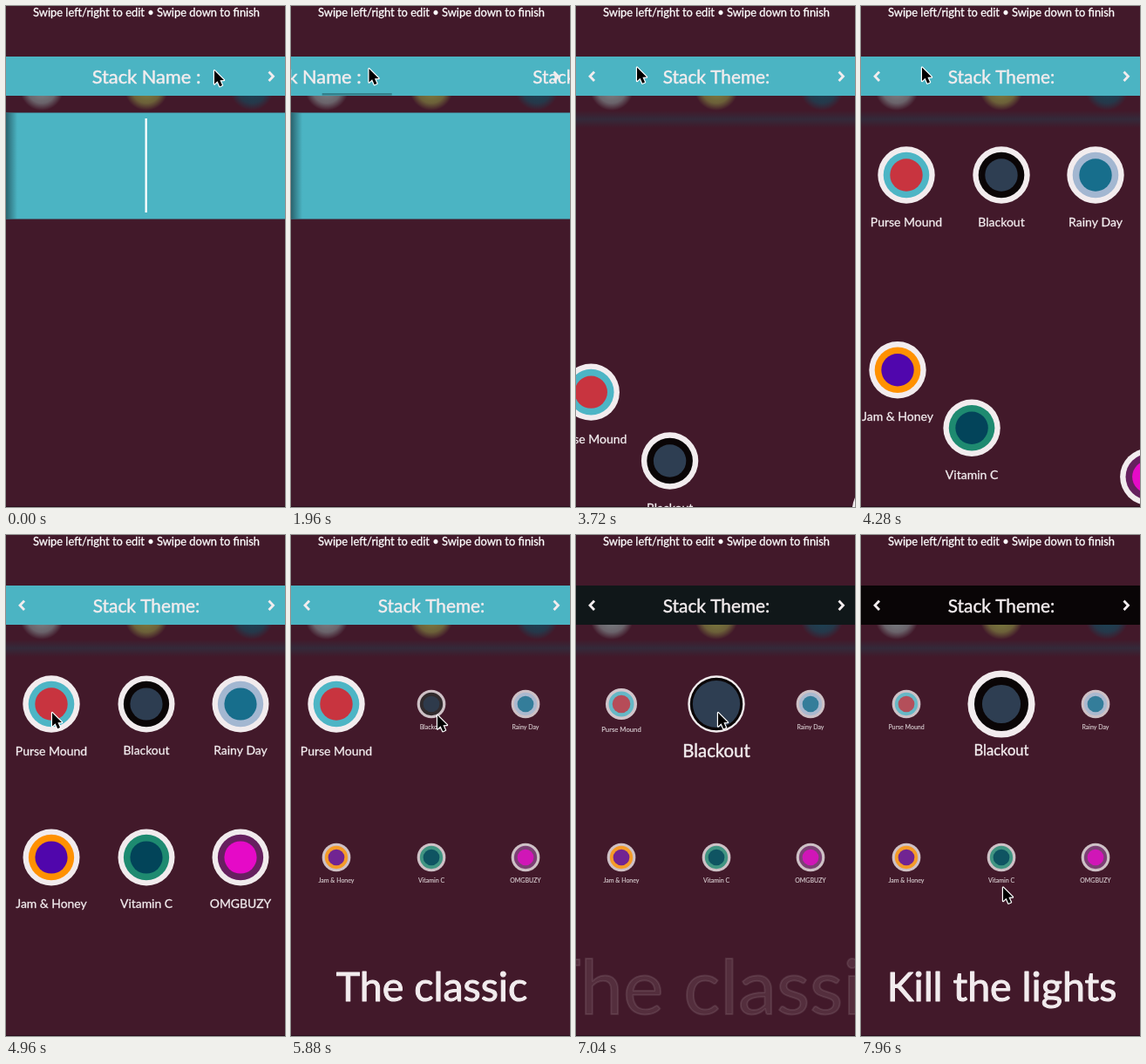
An HTML page with a canvas that plays this animation: 320 by 575 pixels, repeating every 8000 ms.

```html
<!DOCTYPE html>
<html lang="en">
<head>
<meta charset="utf-8">
<title>Stack theme picker</title>
<style>
  html, body { margin: 0; width: 100%; height: 100%; overflow: hidden; background: #42192a; }
  canvas { display: block; width: 320px; height: 575px; }
</style>
</head>
<body>
<canvas id="stage"></canvas>
<script>
const W = 320, H = 575, LOOP = 8000;
const BG = '#42192a', WHITE = '#f2ecee', TEAL = [75, 180, 195], BLACK = [9, 5, 6];
const canvas = document.getElementById('stage');
const ctx = canvas.getContext('2d');
const ratio = window.devicePixelRatio || 1;
canvas.width = W * ratio;
canvas.height = H * ratio;

const themes = [
  { name: 'Purse Mound', ring: '#4db5c5', dot: '#c8343f', x: 52,  y: 194, from: [-60, 430], start: 3400 },
  { name: 'Blackout',    ring: '#0a0506', dot: '#2e3e52', x: 161, y: 194, from: [-70, 430], start: 3480 },
  { name: 'Rainy Day',   ring: '#a3b7d1', dot: '#176e8c', x: 269, y: 194, from: [90, 430],  start: 3560 },
  { name: 'Jam & Honey', ring: '#ff9100', dot: '#5006ad', x: 52,  y: 370, from: [-51, 244], start: 3800 },
  { name: 'Vitamin C',   ring: '#1e8a70', dot: '#03445a', x: 161, y: 370, from: [-93, 313], start: 3880 },
  { name: 'OMGBUZY',     ring: '#66205f', dot: '#e60bc8', x: 269, y: 370, from: [105, 294], start: 3960 }
];

const linear = p => p;
const smooth = p => p * p * (3 - 2 * p);
const quad = p => p < .5 ? 2 * p * p : 1 - 2 * (1 - p) ** 2;
const mix = (a, b, p) => a + (b - a) * p;

function progress(t, start, end, ease = smooth) {
  return ease(Math.min(1, Math.max(0, (t - start) / (end - start))));
}

// Value at time t through [time, value] keys.
function track(t, keys, ease = smooth) {
  let value = keys[0][1];
  for (let i = 1; i < keys.length; i++) {
    if (t >= keys[i - 1][0])
      value = mix(keys[i - 1][1], keys[i][1], progress(t, keys[i - 1][0], keys[i][0], ease));
  }
  return value;
}

function rect(x, y, w, h, fill) {
  ctx.fillStyle = fill;
  ctx.fillRect(x, y, w, h);
}

function circle(r, fill) {
  ctx.fillStyle = fill;
  ctx.beginPath();
  ctx.arc(0, 0, r, 0, 2 * Math.PI);
  ctx.fill();
}

// Centred text, slightly thickened to a medium weight.
function text(string, x, y, size, color = WHITE) {
  ctx.font = `${size}px Lato, sans-serif`;
  ctx.textAlign = 'center';
  ctx.fillStyle = ctx.strokeStyle = color;
  ctx.lineWidth = size * .022;
  ctx.lineJoin = 'round';
  ctx.fillText(string, x, y);
  ctx.strokeText(string, x, y);
}

function layer(alpha, draw) {
  if (alpha <= 0) return;
  ctx.save();
  ctx.globalAlpha = Math.min(1, alpha);
  draw();
  ctx.restore();
}

function blurredDots() {
  ctx.save();
  ctx.beginPath();
  ctx.rect(0, 103, W, 20);
  ctx.clip();
  [[41, '120,124,128'], [161, '122,120,62'], [282, '28,66,84']].forEach(([x, rgb]) => {
    const glow = ctx.createRadialGradient(x, 95, 8, x, 95, 25);
    glow.addColorStop(0, `rgba(${rgb},.95)`);
    glow.addColorStop(.5, `rgba(${rgb},.75)`);
    glow.addColorStop(1, `rgba(${rgb},0)`);
    rect(x - 28, 103, 56, 20, glow);
  });
  ctx.restore();
}

function shade() {
  const band = ctx.createLinearGradient(0, 120, 0, 140);
  band.addColorStop(0, 'rgba(48,46,62,0)');
  band.addColorStop(.5, 'rgba(48,46,62,.8)');
  band.addColorStop(1, 'rgba(48,46,62,0)');
  rect(0, 120, W, 20, band);
}

function namePanel(t) {
  layer(1 - progress(t, 3040, 3540, quad), () => {
    rect(0, 122.5, W, 122, `rgb(${TEAL})`);
    layer(1 - progress(t, 2600, 2900), () => {
      const edge = ctx.createLinearGradient(0, 0, 13, 0);
      edge.addColorStop(0, 'rgba(35,85,95,.85)');
      edge.addColorStop(1, 'rgba(35,85,95,0)');
      rect(0, 122.5, 13, 122, edge);
    });
    if (t < 1800 && t % 1000 < 560) rect(159.5, 129, 2.3, 108, '#fff');
  });
}

function chevron(x, dir) {
  ctx.strokeStyle = WHITE;
  ctx.lineWidth = 2.8;
  ctx.lineJoin = 'miter';
  ctx.beginPath();
  ctx.moveTo(x - 2.5 * dir, 75.5);
  ctx.lineTo(x + 2.5 * dir, 80.7);
  ctx.lineTo(x - 2.5 * dir, 86);
  ctx.stroke();
}

function titleBar(t, scroll) {
  const dark = progress(t, 6240, 7240);
  rect(0, 58, W, 45, `rgb(${TEAL.map((c, i) => Math.round(mix(c, BLACK[i], dark)))})`);
  text('Stack Name :', 161 - scroll, 89, 21.8);
  text('Stack Theme:', 481 - scroll, 89, 20.8);
  chevron(304, 1);
  layer(progress(t, 2300, 2500), () => chevron(18.5, -1));
  const bar = progress(t, 1640, 1700) * (1 - progress(t, 2550, 2800));
  layer(bar, () => rect(scroll / 4, 100, 80, 2.5, '#34808b'));
}

function themeScale(t, index) {
  if (index === 0) {
    const pulse = .18 * Math.sin(Math.PI * progress(t, 5000, 5600, linear));
    return 1 + pulse - .5 * progress(t, 6240, 7240);
  }
  const shrunk = 1 - .5 * progress(t, 4900, 5840);
  return index === 1 && t > 6240
    ? track(t, [[6240, .5], [6960, 1], [7500, 1], [7960, 1.18]])
    : shrunk;
}

function themeItem(t, theme, index) {
  if (t < theme.start) return;
  const away = 1 - progress(t, theme.start, theme.start + 700, quad);
  const scale = themeScale(t, index);
  const swell = index === 1 ? track(t, [[6500, 1], [7040, 1.45], [7500, 1]]) : 1;
  const labelScale = index === 0 ? Math.min(1, scale) : scale * swell;
  layer(.8 + .4 * (scale - .5), () => {
    ctx.translate(theme.x + theme.from[0] * away, theme.y + theme.from[1] * away);
    circle(32.7 * scale, WHITE);
    circle(26.3 * scale * (1 + (swell - 1) / 3), theme.ring);
    circle(18.7 * scale * swell, theme.dot);
    ctx.translate(0, 53.5 * Math.min(1, scale));
    ctx.scale(labelScale, labelScale);
    text(theme.name, 0, 5, 14);
  });
}

function slogan(string, alpha, scale) {
  layer(alpha, () => {
    ctx.translate(161.5, 518);
    ctx.scale(scale, scale);
    text(string, 0, 17, 46.5);
  });
}

function pointer(t, scroll) {
  const x = t < 1960 ? 238 - scroll * 1.05 :
    track(t, [[1960, 88.5], [2240, 69], [4350, 69], [4850, 52], [5250, 52], [5800, 167], [6100, 167], [6300, 162]]);
  const y = track(t, [[1640, 73], [1960, 71], [2240, 69.5], [4350, 69.5], [4850, 203], [5250, 203],
    [5800, 206], [6100, 206], [6300, 203], [7200, 203], [7800, 403.5]]);
  ctx.save();
  ctx.translate(x + 1, y + 1);
  ctx.beginPath();
  [[0, 0], [0, 15.5], [3.6, 12.2], [6.2, 18.2], [9, 17], [6.4, 11.2], [11, 11]]
    .forEach(([px, py]) => ctx.lineTo(px, py));
  ctx.closePath();
  ctx.lineJoin = 'round';
  ctx.lineWidth = 2.4;
  ctx.strokeStyle = '#fff';
  ctx.stroke();
  ctx.fillStyle = '#000';
  ctx.fill();
  ctx.restore();
}

function draw(t) {
  ctx.setTransform(ratio, 0, 0, ratio, 0, 0);
  rect(0, 0, W, H, BG);
  rect(0, H - 1, W, 1, '#2a0d1b');
  const scroll = track(t, [[1640, 0], [1720, 30], [1960, 142], [2120, 250], [2280, 308], [2400, 320]], linear);
  const leave = progress(t, 6240, 7240);

  text('Swipe left/right to edit • Swipe down to finish', 161, 12, 12.9, '#fff');
  blurredDots();
  shade();
  namePanel(t);
  titleBar(t, scroll);
  themes.forEach((theme, i) => themeItem(t, theme, i));
  slogan('The classic', progress(t, 5300, 5860) * (1 - leave), 1 + leave);
  slogan('Kill the lights', progress(t, 7250, 7750), 1);
  pointer(t, scroll);
}

function tick() {
  draw(performance.now() % LOOP);
  requestAnimationFrame(tick);
}
tick();
</script>
</body>
</html>
```
